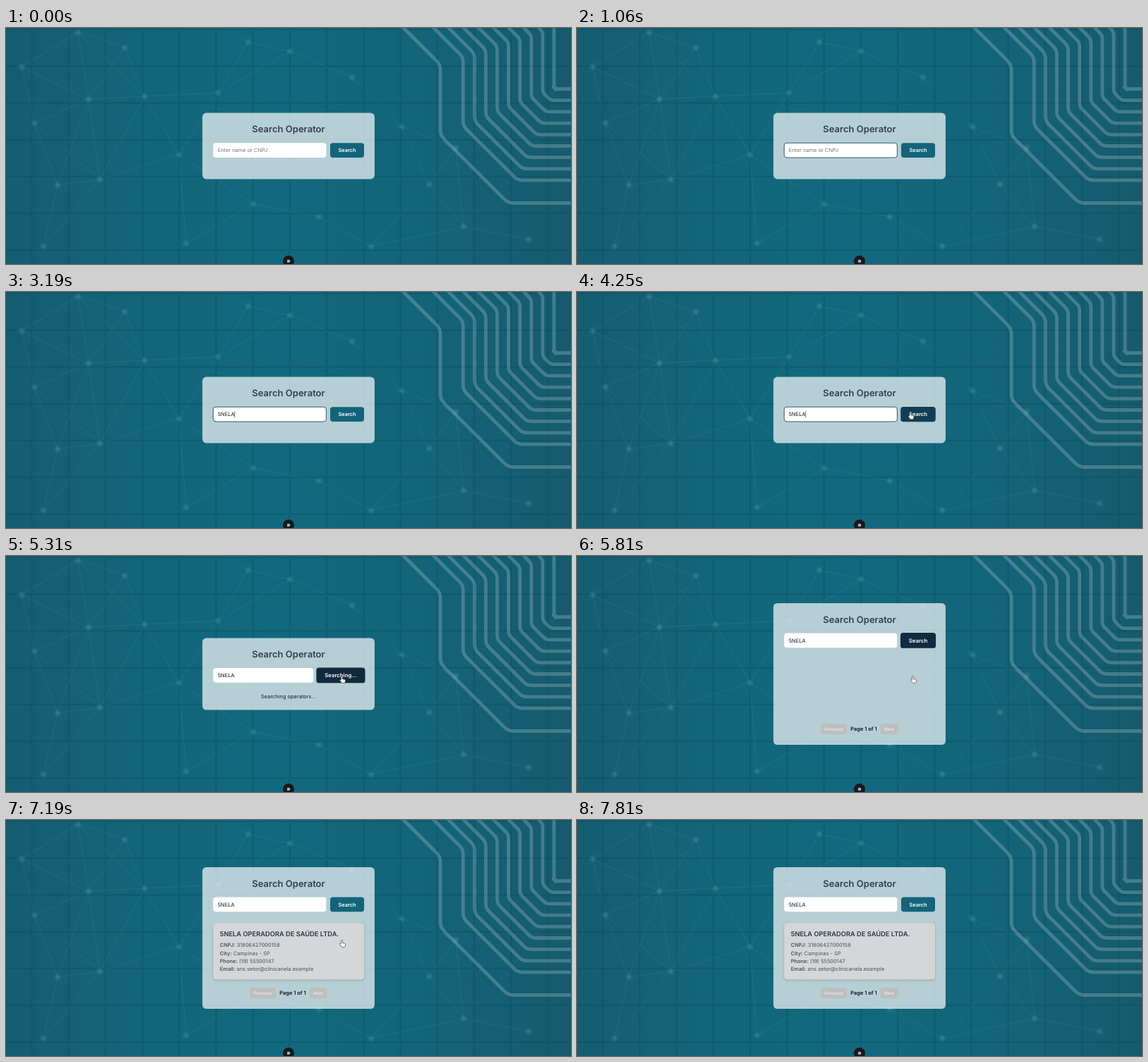
Recreate the animation shown at these times as an HTML page. Size 800x335 px, loop 8 s.

```html
<!DOCTYPE html>
<html lang="en">
<head>
<meta charset="utf-8">
<title>Search Operator</title>
<style>
  html, body { margin: 0; width: 100%; height: 100%; overflow: hidden; background: #12667a; }
  svg { display: block; width: 100vw; height: 100vh; }
  text { font: 400 7.44px Inter, sans-serif; text-rendering: geometricPrecision; white-space: pre; }
  .mid { text-anchor: middle; }
  .bold { font-weight: 600; }
  .title { font-size: 13.02px; fill: #33414d; }
  .name { font-size: 9.3px; fill: #263645; }
  .page { font-size: 6.2px; fill: #ece7e5; }
  .row { fill: #4a545f; }
</style>
</head>
<body>
<svg viewBox="0 0 800 335" preserveAspectRatio="none">
  <defs>
    <linearGradient id="sea">
      <stop offset="0" stop-color="#155d70"/>
      <stop offset=".2" stop-color="#136478"/>
      <stop offset=".47" stop-color="#11697f"/>
      <stop offset=".75" stop-color="#136478"/>
      <stop offset="1" stop-color="#165b6d"/>
    </linearGradient>
    <radialGradient id="glow">
      <stop offset="0" stop-color="#8fd0dc" stop-opacity=".22"/>
      <stop offset="1" stop-color="#8fd0dc" stop-opacity="0"/>
    </radialGradient>
  </defs>
  <rect width="800" height="335" fill="url(#sea)"/>
  <path id="grid" stroke="#0c4f62" stroke-width="2.6" opacity=".38"/>
  <path id="web" stroke="#8fd0dc" stroke-width=".9" opacity=".11"/>
  <g id="nodes" fill="url(#glow)"></g>
  <path id="traces" fill="none" stroke="#fff" stroke-opacity=".2" stroke-width="4.8" stroke-linejoin="round"/>
  <circle cx="400" cy="331" r="8" fill="#14191d"/>
  <circle cx="400" cy="331" r="2.3" fill="#a9adb0"/>

  <rect id="panel" x="278.1" width="243.8" rx="5.6" fill="#fafafa" fill-opacity=".71"/>
  <g id="form">
    <text class="mid bold title" x="400" y="148.3">Search Operator</text>
    <rect id="field" x="293.3" y="163.2" height="20.8" rx="3.7" fill="#fff" stroke="#1d4a5f" stroke-width=".9"/>
    <text id="hint" x="299.7" y="176.3" fill="#757b80">Enter name or CNPJ</text>
    <text id="typed" x="299.7" y="176.3" fill="#111a22"></text>
    <rect id="caret" y="169.2" width=".6" height="9" fill="#111"/>
    <g id="button">
      <rect id="face" y="-10.4" height="20.8" rx="3.7"/>
      <text id="label" class="mid bold" y="2.7" fill="#fff"></text>
    </g>
  </g>
  <text id="loading" class="mid" x="400" y="202.1" fill="#14202b">Searching operators...</text>

  <g id="result">
    <g id="card">
      <rect x="293.3" y="146.3" width="213.7" height="80.3" rx="4.6" fill="#d5d6d8" style="filter:drop-shadow(0 1px 1.5px #0003)"/>
      <text class="bold name" x="302.7" y="164.7">5NELA OPERADORA DE SAÚDE LTDA.</text>
      <g id="rows"></g>
    </g>
    <g fill="#bdbfbe">
      <rect x="345.3" y="238" width="37" height="15.2" rx="2.8"/>
      <rect x="429.8" y="238" width="24.6" height="15.2" rx="2.8"/>
    </g>
    <text class="mid bold page" x="363.9" y="247.9">Previous</text>
    <text class="mid bold" x="406" y="248.4" fill="#0b1116">Page 1 of 1</text>
    <text class="mid bold page" x="442" y="247.9">Next</text>
  </g>
  <path id="hand" fill="#fff" stroke="#222" stroke-width=".6"
    d="M-1 5V.9a1 1 0 0 1 2 0V4l3.2.8q1 .3.9 1.4L4.700 8.500Q4.300 10 3 10H1Q0 10-.6 9L-2.800 6q-.4-1 .6-1Z"/>
</svg>
<script>
const $ = id => document.getElementById(id);
const set = (id, attrs) => { for (const k in attrs) $(id).setAttribute(k, attrs[k]); };
const show = (id, on) => set(id, { visibility: on ? 'visible' : 'hidden' });
const ramp = (t, from, to) => Math.min(1, Math.max(0, (t - from) / (to - from)));
const smooth = (t, from, to) => { const u = ramp(t, from, to); return u * u * (3 - 2 * u); };

// Backdrop: tiles, web of nodes, rounded circuit traces
let grid = '';
for (let x = 36.5; x < 800; x += 52.2) grid += `M${x} 0V335`;
for (let y = 2; y < 335; y += 52.2) grid += `M0 ${y}H800`;
set('grid', { d: grid });

const nodes = [[22, 55], [102, 6], [117, 101], [196, 97], [168, 28], [40, 135], [73, 223],
  [133, 215], [53, 310], [255, 306], [245, 180], [343, 20], [402, 33], [300, 92], [443, 268],
  [350, 250], [517, 310], [599, 222], [648, 282], [560, 140], [490, 70], [637, 170], [740, 300]];
let web = '';
nodes.forEach(([x, y], i) => {
  $('nodes').innerHTML += `<circle cx="${x}" cy="${y}" r="6"/>`;
  for (const [a, b] of nodes.slice(i + 1))
    if (Math.hypot(a - x, b - y) < 135) web += `M${x} ${y}L${a} ${b}`;
});
set('web', { d: web });

function trace(k) {
  const x = 776 - 16.1 * k, y = 86.5 + 16.2 * k, top = 5.2 * k, cut = 9.4 * k + 2, r = 4 + k * .4;
  const s = r * .7;
  return `M${x - top - 4} -4L${x - s} ${top - s}Q${x} ${top} ${x} ${top + r}` +
    `V${y - cut - r}Q${x} ${y - cut} ${x + s} ${y - cut + s}` +
    `L${x + cut - s} ${y - s}Q${x + cut} ${y} ${x + cut + r} ${y}H804`;
}
set('traces', { d: [0, 1, 2, 3, 4, 5, 6, 7, 8, 10].map(trace).join('') });

const details = { CNPJ: '31806427000158', City: 'Campinas - SP', Phone: '(19) 55500147',
  Email: 'ans.setor@clinicanela.example' };
$('rows').innerHTML = Object.entries(details).map(([k, v], i) =>
  `<text class="row" x="302.7" y="${180.4 + 11.25 * i}"><tspan class="bold">${k}:</tspan> ${v}</text>`).join('');

const query = '5NELA', keys = [1940, 2560, 2810, 3000, 3190];
const FOCUS = 560, CLICK = 5060, DONE = 5810;

function draw(t) {
  const busy = t >= CLICK && t < DONE, done = t >= DONE;

  const top = done ? 66.9 : busy ? 116.4 : 120.6;
  set('panel', { y: top, height: 335 - 2 * top });
  set('form', { transform: `translate(0 ${top - 120.6})` });

  const hover = smooth(t, 4060, 4370) - smooth(t, DONE, 6000);
  const w = busy ? 66.1 : 48;
  const mix = (a, b) => Math.round(a + (b - a) * hover);
  set('button', { transform: `translate(${507 - w / 2} 173.6) scale(${1 + .045 * hover})` });
  set('face', { x: -w / 2, width: w, fill: `rgb(${mix(19, 16)},${mix(100, 43)},${mix(122, 62)})` });
  $('label').textContent = busy ? 'Searching...' : 'Search';
  set('field', { width: 208.1 - w, 'stroke-opacity': smooth(t, FOCUS, 810) - smooth(t, CLICK, 5310) });

  const count = keys.filter(k => t >= k).length;
  const last = count ? keys[count - 1] : FOCUS;
  $('typed').textContent = query.slice(0, count);
  show('hint', !count);
  show('caret', t >= FOCUS && t < CLICK && (t - last) % 1060 < 500);
  set('caret', { x: 299.7 + (count ? $('typed').getComputedTextLength() : 0) });

  show('loading', busy);
  show('result', done);
  const grow = smooth(t, DONE, 6190), s = .89 + .11 * grow;
  set('card', { opacity: Math.sqrt(grow), transform: `translate(400 186.5) scale(${s}) translate(-400 -186.5)` });

  const enter = 1 - (1 - ramp(t, 4060, 4440)) ** 2, leave = smooth(t, 7190, 7810);
  const x = 461 + 14.5 * enter - 168 * leave;
  const y = 172 - 1.5 * enter + 34 * Math.sin(1.5 * Math.PI * leave);
  set('hand', { transform: `translate(${x} ${y})` });
  show('hand', t >= 4060 && t < 7810);
}

function tick() {
  draw(performance.now() % 8000);
  requestAnimationFrame(tick);
}
tick();
</script>
</body>
</html>
```
